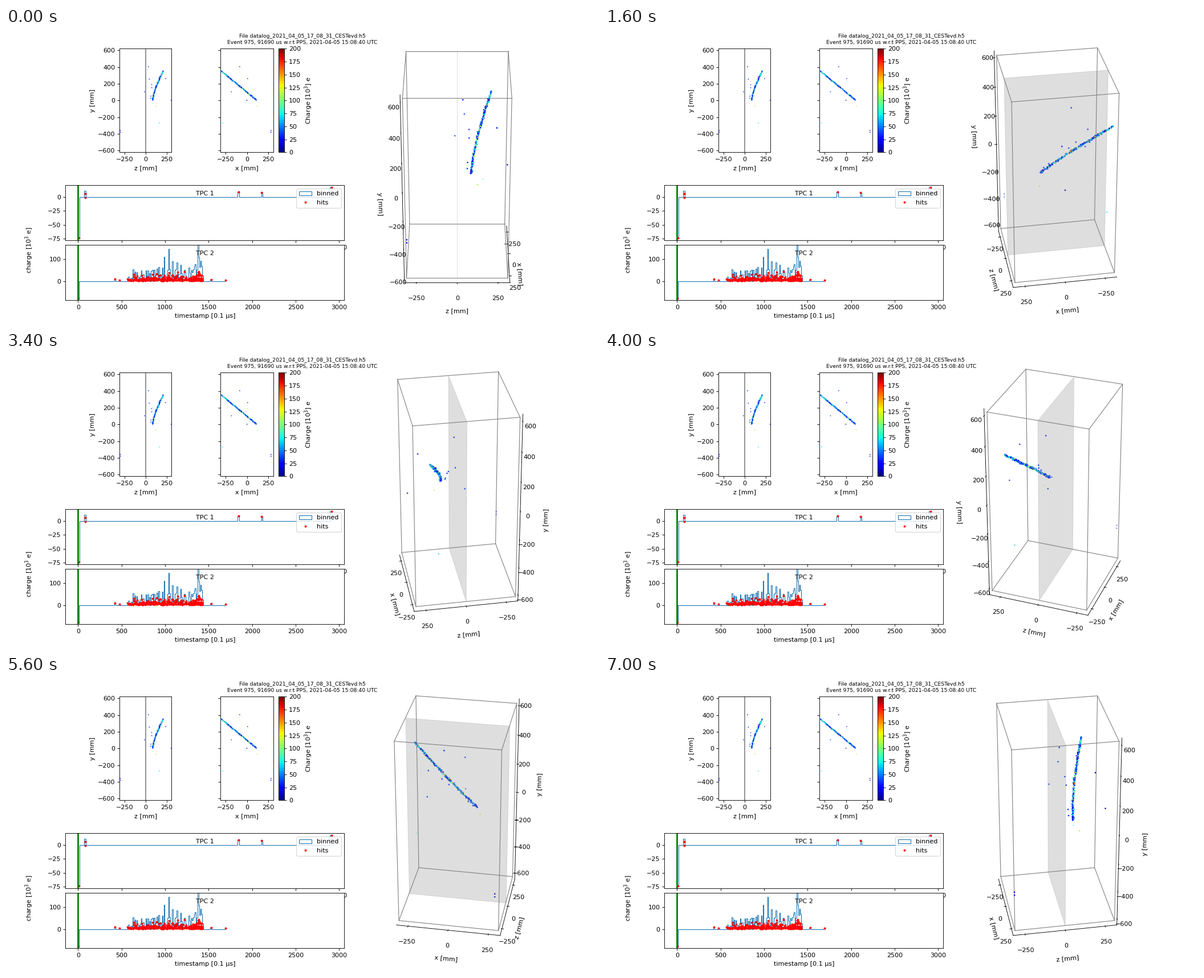
A matplotlib script that plays this animation: 1040 px wide and 520 px high, repeating every 7200 ms.

```python
import itertools
import math

import matplotlib.pyplot as plt
import numpy as np
from matplotlib.animation import FuncAnimation
from mpl_toolkits.mplot3d.art3d import Poly3DCollection

W, H, DPI = 1040, 520, 80
FRAMES, INTERVAL = 36, 200
HALF_XZ, HALF_Y = 310, 620
MARGIN = 25 / 24
CHARGE = dict(cmap="jet", vmin=0, vmax=200)

rng = np.random.default_rng(975)
fig = plt.figure(figsize=(W / DPI, H / DPI), dpi=DPI, facecolor="white")


def px_axes(left, top, right, bottom, **kwargs):
    """Add axes from pixel edges measured from the top left."""
    return fig.add_axes([left / W, 1 - bottom / H, (right - left) / W,
                         (bottom - top) / H], **kwargs)


def track(p):
    """Return x, y, z at fraction p along the particle's path."""
    return np.array([-310 + 432 * p, 360 - 362 * p,
                     84 + 131 * (1 - p) ** 1.45])


def make_hits():
    """Return x, y, z and charge of the track, its side hits and the noise."""
    p = rng.uniform(0, 1, 290)
    main = track(p) + rng.normal(0, 2.8, (3, p.size))
    main = np.vstack([main, 16 + rng.gamma(1.2, 34, p.size).clip(0, 175)])

    # Side hits leave the path along z, farthest near its start.
    p = np.array([0.29, 0.47, 0.57, 0.85, 0.92])
    side = track(p)
    side[2] -= 24 * p ** -1.3
    side = np.vstack([side, np.full(p.size, 33)])

    noise = np.transpose([
        (-85, 405, 34, 32), (-182, 105, -14, 36), (8, 263, 238, 30),
        (123, -65, 122, 112), (-286, -269, 163, 72), (0, 3, 306, 4),
        (283, -358, -305, 22), (283, -380, -305, 26),
    ])
    return np.hstack([main, side, noise])


def draw_projections(x, y, z, charge):
    panels = [(px_axes(199.4, 36.4, 290.4, 218.4), z, "z [mm]"),
              (px_axes(376.3, 36.4, 468.7, 218.4), x, "x [mm]")]
    for ax, across, label in panels:
        dots = ax.scatter(across, y, s=0.3, lw=1, c=charge, zorder=3, **CHARGE)
        ax.set(xlim=(-HALF_XZ, HALF_XZ), ylim=(-HALF_Y, HALF_Y), xlabel=label,
               xticks=(-250, 0, 250), yticks=range(-600, 601, 200))
    panels[0][0].axvline(0, color="gray", lw=1.5)
    panels[0][0].set_ylabel("y [mm]")
    panels[1][0].tick_params(labelleft=False)
    bar = fig.colorbar(dots, cax=px_axes(478.4, 36.4, 488.4, 218.4),
                       ticks=range(0, 201, 25))
    bar.set_label("Charge [$10^3$] e")


def draw_timeline(ax, name, times, charges, **limits):
    ax.hist(times, bins=162, range=(0, max(times) + 1), weights=charges,
            histtype="step", color="C0", lw=1, label="binned")
    ax.plot(times, charges, "r.", ms=5, label="hits")
    ax.axvline(0, color="green", lw=2.5)
    ax.text(0.5, 0.85, name, transform=ax.transAxes, ha="center", va="center")
    ax.set(xlim=(-144, 3059), xticks=range(0, 3001, 500), **limits)


def draw_timelines():
    upper = px_axes(104.4, 276.4, 593.4, 373.4)
    draw_timeline(upper, "TPC 1", [10, 84, 84, 84, 1845, 2108, 2912],
                  [-73, 6, 6, -1, 9, 8, 17],
                  ylim=(-78, 21), yticks=(-75, -50, -25, 0))
    upper.legend(loc="upper right")

    # The burst of hits grows denser and stronger with time.
    rise = rng.uniform(0, 1, 290) ** 0.75
    times = 565 + 865 * rise
    charges = 3 + rng.exponential(6 + 5 * rise).clip(0, 25 + 20 * rise)
    lower = px_axes(104.4, 381.4, 593.4, 478.4)
    draw_timeline(lower, "TPC 2", np.r_[times, 4, 425, 477, 1527, 1697],
                  np.r_[charges, -77, 11, 6, 7, 6],
                  ylim=(-87, 165), yticks=(0, 100))
    lower.set_xlabel("timestamp [0.1 µs]")
    fig.text(41 / W, 1 - 390 / H, "charge [$10^3$ e]", rotation=90,
             ha="center", va="center")


def draw_detector(x, y, z, charge):
    ax = px_axes(564.3, 26, 1006.3, 468, projection="3d")
    ax.patch.set_visible(False)
    ax.grid(False)
    for axis in (ax.xaxis, ax.yaxis, ax.zaxis):
        axis.pane.set_visible(False)
    ax.scatter(x, z, y, s=2, c=charge, **CHARGE)

    size = np.array([HALF_XZ, HALF_XZ, HALF_Y])
    corners = np.array(list(itertools.product((-1, 1), repeat=3)))
    for a, b in itertools.combinations(corners, 2):
        if np.sum(a != b) == 1:
            ax.plot(*np.column_stack([a * size, b * size]), color="gray", lw=1)

    cathode = [(sx * HALF_XZ, 0, sy * HALF_Y)
               for sx, sy in ((-1, -1), (1, -1), (1, 1), (-1, 1))]
    gray = (0.5, 0.5, 0.5, 0.26)
    ax.add_collection3d(Poly3DCollection([cathode], facecolors=[gray],
                                         edgecolors=[gray], linewidths=0.8))

    lim_xz = (-HALF_XZ * MARGIN, HALF_XZ * MARGIN)
    ax.set(xlim=lim_xz, ylim=lim_xz, zlim=(-HALF_Y * MARGIN, HALF_Y * MARGIN),
           xticks=(-250, 0, 250), yticks=(-250, 0, 250),
           zticks=range(-600, 601, 200), xlabel="x [mm]", ylabel="z [mm]")
    ax.set_zlabel("y [mm]", labelpad=20)
    ax.set_box_aspect((1, 1, 2))
    return ax


fig.suptitle("File datalog_2021_04_05_17_08_31_CESTevd.h5\n"
             "Event 975, 91690 us w.r.t PPS, 2021-04-05 15:08:40 UTC",
             x=0.5, y=0.98, fontsize="small")
hits = make_hits()
draw_projections(*hits)
draw_timelines()
detector = draw_detector(*hits)


def update(frame):
    azimuth = 360 * frame / FRAMES
    # A tiny offset settles which side carries the axes in face-on views.
    nudge = math.copysign(1e-6, math.cos(math.radians(azimuth + 45)))
    detector.view_init(elev=30, azim=azimuth + nudge)
    return []


anim = FuncAnimation(fig, update, frames=FRAMES, interval=INTERVAL,
                     init_func=lambda: [], repeat=True, repeat_delay=0)
plt.show()
```
